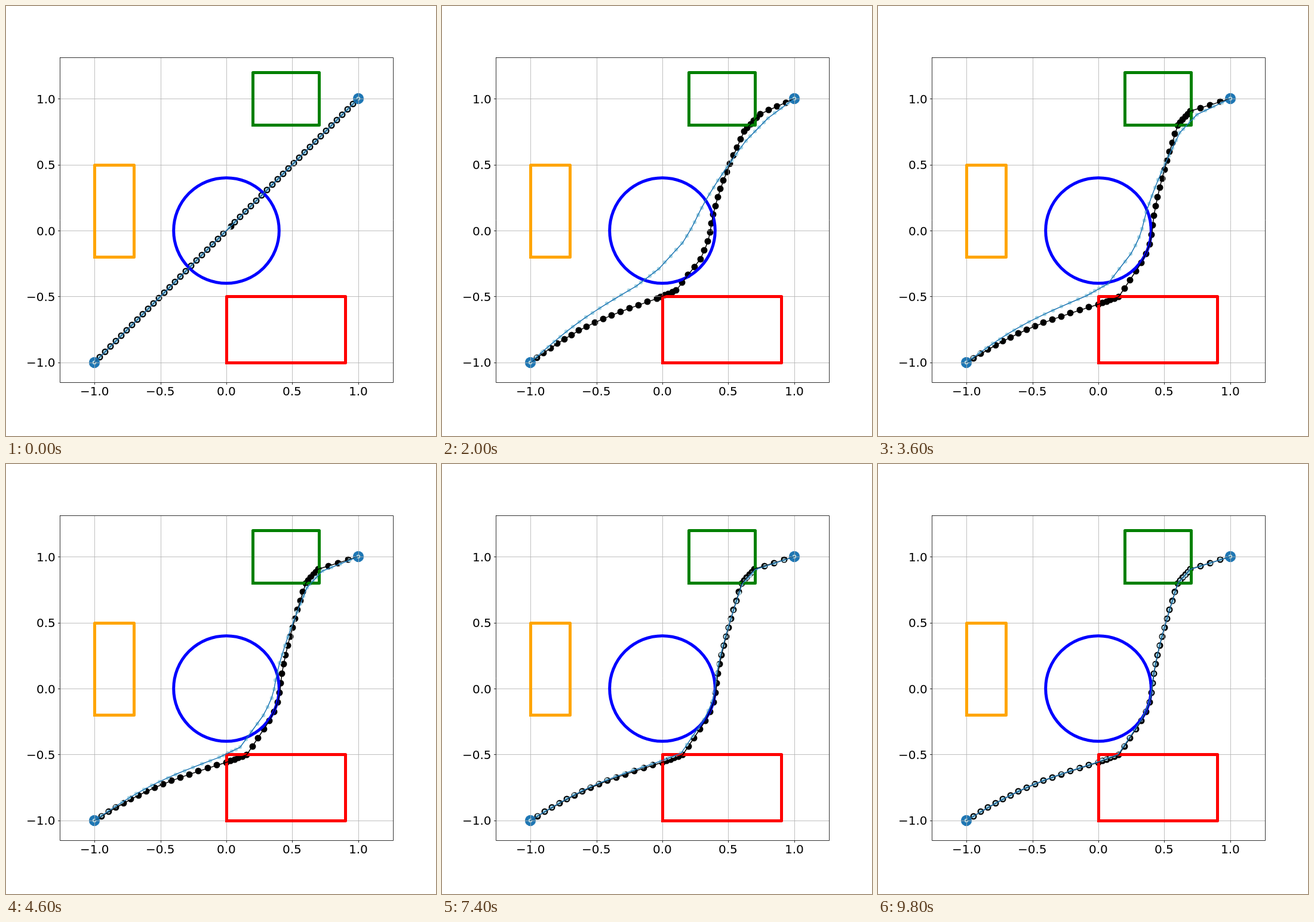
Recreate the animation shown at these times as an HTML page with a canvas. Size 720 by 720 pixels, loop 10000 ms.

```html
<!DOCTYPE html>
<html lang="en">
<head>
<meta charset="utf-8">
<title>Path relaxation</title>
<style>
  html, body { margin: 0; width: 100%; height: 100%; overflow: hidden; background: #fff; }
  canvas { display: block; }
</style>
</head>
<body>
<canvas id="stage" width="720" height="720"></canvas>
<script>
const ctx = document.getElementById('stage').getContext('2d');
const STEP_MS = 200, STEPS = 50, COUNT = 50, LAST = COUNT - 1;
const UNIT = 220.8, BLUE = '#1f77b4';
const toX = v => 369 + UNIT * v;
const toY = v => 376 - UNIT * v;
const snap = v => Math.round(v) + 0.5;
const snapX = v => snap(toX(v));
const snapY = v => snap(toY(v));

const START = [toX(-1), toY(-1)], GOAL = [toX(1), toY(1)];
const mix = (a, b, u) => a + (b - a) * u;
const mixPoint = (p, q, u) => p.map((v, axis) => mix(v, q[axis], u));
const mixPath = (p, q, u) => p.map((pt, i) => mixPoint(pt, q[i], u));

// Smooth interpolation of one run of knots; t are indices, v values.
function splineRun(t, v, out) {
  const n = t.length - 1;
  const slope = i => (v[i + 1] - v[i]) / (t[i + 1] - t[i]);
  const m = [];
  for (let i = 1; i < n; i++) {
    const left = t[i] - t[i - 1], right = t[i + 1] - t[i];
    m[i] = (slope(i - 1) * right + slope(i) * left) / (left + right);
  }
  m[0] = n > 1 ? (3 * slope(0) - m[1]) / 2 : slope(0);
  m[n] = n > 1 ? (3 * slope(n - 1) - m[n - 1]) / 2 : slope(0);
  for (let i = 0; i < n; i++) {
    const h = t[i + 1] - t[i];
    for (let k = t[i]; k <= t[i + 1]; k++) {
      const u = (k - t[i]) / h, w = 1 - u;
      out[k] = v[i] * w * w * (1 + 2 * u) + v[i + 1] * u * u * (3 - 2 * u)
             + h * u * w * (m[i] * w - m[i + 1] * u);
    }
  }
}

// The path is smooth between the corners it gets from the obstacles.
const KNOTS = [0, 8, 16, 21, 25, 27, 30, 40, 45, LAST];
const CORNERS = [0, 16, 21, 25, 40, 45, LAST];

function bentPath(...bends) {
  const points = [START, ...bends, GOAL];
  const [xs, ys] = [0, 1].map(axis => {
    const out = [];
    for (let c = 1; c < CORNERS.length; c++) {
      const a = KNOTS.indexOf(CORNERS[c - 1]), b = KNOTS.indexOf(CORNERS[c]) + 1;
      splineRun(KNOTS.slice(a, b), points.slice(a, b).map(p => p[axis]), out);
    }
    return out;
  });
  return xs.map((x, i) => [x, ys[i]]);
}

const straight = Array.from({ length: COUNT }, (_, i) => mixPoint(START, GOAL, i / LAST));
const nudged = straight.map((p, i) => i === 25 ? [p[0] + 3, p[1] - 2] : p);
const pushed = bentPath([234, 530], [348, 478], [379, 462], [422, 416],
                        [433, 388], [444, 347], [511, 222], [545, 187]);
const settled = bentPath([249, 542], [369, 499.5], [403, 487], [441, 430],
                         [455, 399], [462, 351], [502, 199.5], [523, 176]);

// Even push away from the obstacles, then a slowing approach to the final path.
const PUSH_STEPS = 6, SETTLE_STEPS = 12;
function solvedAt(step) {
  if (step < PUSH_STEPS) return mixPath(nudged, pushed, step / PUSH_STEPS);
  const u = Math.min(1, (step - PUSH_STEPS) / SETTLE_STEPS);
  return mixPath(pushed, settled, 1 - (1 - u) ** 2);
}

// The blue path moves a tenth of the way to the solved path at every step.
const frames = [{ solved: nudged, eased: straight }];
for (let s = 1; s < STEPS; s++) {
  const solved = solvedAt(s);
  frames.push({ solved, eased: mixPath(frames[s - 1].eased, solved, 0.1) });
}

function line(points, color, width, cap = 'square') {
  ctx.beginPath();
  points.forEach(([x, y]) => ctx.lineTo(x, y));
  ctx.strokeStyle = color;
  ctx.lineWidth = width;
  ctx.lineCap = cap;
  ctx.lineJoin = 'round';
  ctx.stroke();
}

function dots(points, color, diameter) {
  ctx.fillStyle = color;
  for (const [x, y] of points) {
    ctx.beginPath();
    ctx.arc(Math.round(x), Math.round(y), diameter / 2, 0, 2 * Math.PI);
    ctx.fill();
  }
}

function box(x0, y0, x1, y1, color) {
  const l = snapX(x0), r = snapX(x1), b = snapY(y0), t = snapY(y1);
  line([[l, b], [r, b], [r, t], [l, t], [l, b]], color, 5);
}

const LEFT = 90.5, RIGHT = 648.5, TOP = 86.5, BOTTOM = 630.5;
const TICKS = [-1, -0.5, 0, 0.5, 1];

function drawGrid() {
  for (const v of TICKS) {
    line([[snapX(v), TOP], [snapX(v), BOTTOM]], '#b0b0b0', 0.8, 'butt');
    line([[LEFT, snapY(v)], [RIGHT, snapY(v)]], '#b0b0b0', 0.8, 'butt');
  }
}

function drawAxes() {
  ctx.font = '20px "DejaVu Sans", sans-serif';
  ctx.fillStyle = '#000';
  for (const v of TICKS) {
    const x = snapX(v), y = snapY(v);
    const label = v.toFixed(1).replace('-', '\u2212');
    const width = ctx.measureText(label).width;
    line([[x, BOTTOM], [x, BOTTOM + 3.5]], '#000', 0.8, 'butt');
    line([[LEFT, y], [LEFT - 3.5, y]], '#000', 0.8, 'butt');
    ctx.fillText(label, Math.round(toX(v) - width / 2), 652);
    ctx.fillText(label, Math.floor(83 - width), Math.round(toY(v) + 7.6));
  }
  line([[LEFT, TOP], [RIGHT, TOP], [RIGHT, BOTTOM], [LEFT, BOTTOM], [LEFT, TOP]], '#000', 0.8);
}

function drawObstacles() {
  ctx.beginPath();
  ctx.arc(toX(0), toY(0), 0.4 * UNIT, 0, 2 * Math.PI);
  ctx.strokeStyle = '#00f';
  ctx.lineWidth = 5;
  ctx.stroke();
  box(0, -1, 0.9, -0.5, '#f00');
  box(0.2, 0.8, 0.7, 1.2, '#008000');
  box(-1, -0.2, -0.7, 0.5, '#ffa500');
}

function draw({ solved, eased }) {
  ctx.fillStyle = '#fff';
  ctx.fillRect(0, 0, 720, 720);
  dots(solved, '#000', 11);
  dots([START, GOAL], BLUE, 18.3);
  dots(eased, '#add8e6', 6.5);
  drawGrid();
  drawObstacles();
  line(solved, '#000', 1.5);
  line(eased, BLUE, 1.5);
  drawAxes();
}

const start = performance.now();
let shown = -1;
function tick() {
  const step = Math.floor((performance.now() - start) / STEP_MS) % STEPS;
  if (step !== shown) draw(frames[shown = step]);
  requestAnimationFrame(tick);
}
tick();
</script>
</body>
</html>
```
